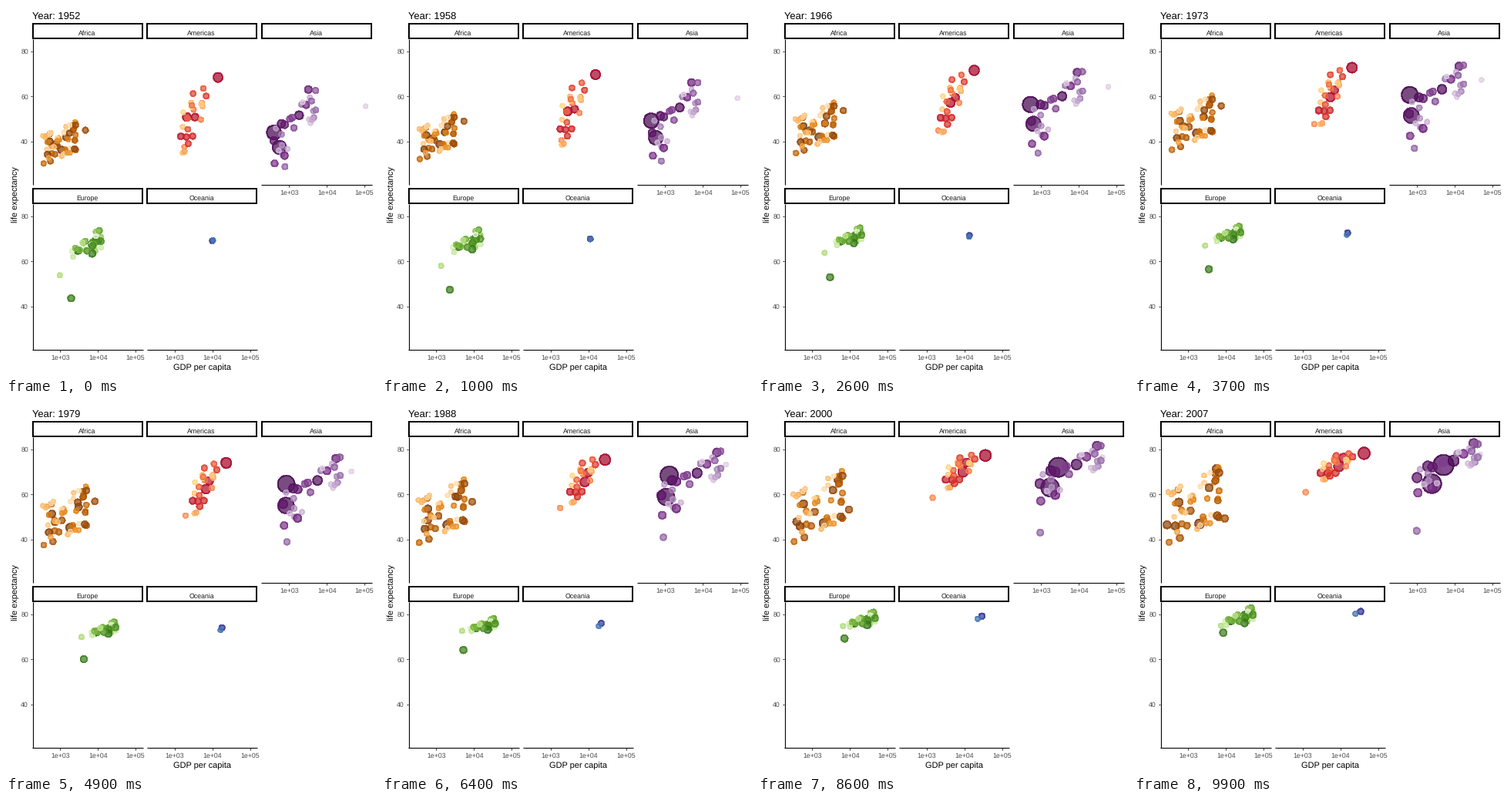
A matplotlib script for the animation above (10000 ms loop, 480x480 px).

```python
import numpy as np
import matplotlib.pyplot as plt
from matplotlib.animation import FuncAnimation
from matplotlib.colors import LinearSegmentedColormap
from matplotlib.patches import Rectangle

FRAMES, STEP = 100, 100
FIRST, LAST = 1952, 2007
plt.rcParams["font.family"] = ["Liberation Sans", "DejaVu Sans"]
plt.rcParams["text.hinting"] = "none"
rng = np.random.default_rng(12)

# leads: population in millions, then (log income, life expectancy) at the
# start, the middle and the end.
# crowd: mean and spread of both values at the same three times.
# pops: count, largest population and decay of the crowd.
CONTINENTS = {
    "Africa": dict(
        cell=(0, 0), shades="#7F3B08 #B35806 #E08214 #FDB863 #FEE0B6",
        growth=.32, tilt=.4, pops=(48, 76, .11),
        leads=[(135, (3.03, 36.3), (3.26, 45.3), (3.3, 46.9)),
               (80, (3.15, 41.9), (3.49, 54.5), (3.75, 71.3)),
               (65, (2.89, 39.1), (2.86, 47.8), (2.44, 46.5)),
               (44, (3.67, 45), (3.92, 56.9), (3.97, 49.3))],
        crowd=[(3.0, .27, 39.2, 4.6), (3.15, .36, 50.3, 6.5), (3.18, .42, 55, 8.3)]),
    "Americas": dict(
        cell=(1, 0), shades="#A50026 #D73027 #F46D43 #FDAE61 #FEE090",
        growth=.48, tilt=.65, pops=(21, 50, .16),
        leads=[(301, (4.15, 68.4), (4.37, 74), (4.63, 78.2)),
               (190, (3.32, 50.9), (3.83, 62.4), (3.96, 72.4)),
               (109, (3.54, 50.8), (3.92, 66.1), (4.08, 76.2)),
               (8.5, (3.26, 37.6), (3.29, 50.7), (3.08, 60.9))],
        crowd=[(3.5, .2, 53, 8.5), (3.8, .19, 65.5, 6.5), (3.9, .25, 73.8, 3.4)]),
    "Asia": dict(
        cell=(2, 0), shades="#40004B #762A83 #9970AB #C2A5CF #E7D4E8",
        growth=.41, tilt=.7, pops=(28, 220, .17),
        leads=[(1318, (2.6, 44), (2.93, 64.7), (3.7, 73)),
               (1110, (2.74, 37.4), (2.92, 55.2), (3.39, 64.7)),
               (127, (3.51, 63), (4.25, 76), (4.5, 82.6)),
               (32, (2.89, 28.8), (2.94, 39), (2.99, 43.8)),
               (2.5, (5.03, 55.6), (4.65, 70.3), (4.67, 77.6))],
        crowd=[(3.15, .33, 46.5, 7.5), (3.6, .45, 61.5, 7), (3.8, .48, 71.5, 5)]),
    "Europe": dict(
        cell=(0, 1), shades="#276419 #4D9221 #7FBC41 #B8E186 #E6F5D0",
        growth=.75, tilt=.75, pops=(26, 60, .15),
        leads=[(82, (3.85, 67.5), (4.32, 73), (4.51, 79.4)),
               (61, (4.0, 69.2), (4.25, 73.2), (4.52, 79.4)),
               (45, (3.29, 43.6), (3.63, 60.2), (3.93, 71.8)),
               (4.5, (2.99, 53.8), (3.57, 70), (3.87, 74.9))],
        crowd=[(3.68, .24, 65.5, 4), (4.14, .2, 72.5, 2), (4.33, .23, 77.5, 2.6)]),
    "Oceania": dict(
        cell=(1, 1), shades="#313695 #4575B4", growth=.45, tilt=0, pops=(0, 1, 1),
        leads=[(20.4, (4.0, 69.1), (4.26, 74.1), (4.54, 81.2)),
               (4.1, (4.02, 69.4), (4.22, 73), (4.4, 80.2))],
        crowd=[]),
}


def px(log_gdp, col):
    return 70.3 + 148.5 * col + 48.9 * (log_gdp - 3)


def py(life, row):
    return 58.7 + 214 * row + 2.925 * (80 - life)


def make_crowd(stats, count, tilt):
    """Key points, shaped (3, count, 2); richer places tend to live longer."""
    rich, luck = rng.uniform(-1.7, 1.7, (2, count))
    health = tilt * rich + np.sqrt(1 - tilt ** 2) * luck
    return np.array([np.column_stack([g + gs * rich, e + es * health])
                     for g, gs, e, es in stats])


fig = plt.figure(figsize=(480 / 72, 480 / 72), dpi=72, facecolor="white")
ax = fig.add_axes([0, 0, 1, 1])
ax.set(xlim=(0, 480), ylim=(480, 0))
ax.axis("off")


def line(x0, y0, x1, y1, color="black"):
    ax.plot([x0, x1], [y0, y1], color=color, lw=1.07, solid_capstyle="butt")


def label(x, y, text, size=8.8, color="#4D4D4D", ha="center", **kw):
    return ax.text(x, y, text, fontsize=size, color=color, ha=ha, va="baseline", **kw)


def y_axis(row):
    top = 43 + 214 * row
    line(34.5, top, 34.5, top + 189)
    for v in (40, 60, 80):
        y = py(v, row)
        line(31.5, y, 34, y, "#333333")
        label(29, y + 3.3, str(v), ha="right")


def x_axis(col, row):
    left, y = 34 + 148.5 * col, 231.5 + 214 * row
    line(left, y, left + 143.5, y)
    for p in (3, 4, 5):
        x = px(p, col)
        line(x, y + .5, x, y + 3, "#333333")
        label(x, y + 13.5, f"1e+0{p}")


class Group:
    """All the bubbles of one panel."""

    def __init__(self, name, spec):
        count, top, decay = spec["pops"]
        self.cell, self.growth = spec["cell"], spec["growth"]
        self.keys = np.array([lead[1:] for lead in spec["leads"]]).swapaxes(0, 1)
        if count:
            crowd = make_crowd(spec["crowd"], count, spec["tilt"])
            self.keys = np.concatenate([self.keys, crowd], axis=1)
        pops = rng.permutation(top * np.exp(-decay * np.arange(count)))
        self.pop = np.append([lead[0] for lead in spec["leads"]], pops)

        rank = np.argsort(np.argsort(-self.pop))
        cmap = LinearSegmentedColormap.from_list(name, spec["shades"].split())
        blank = np.zeros(len(rank))
        self.dots = ax.scatter(blank, blank, c=cmap(rank / rank.max()), alpha=.7,
                               lw=1, antialiased=False, zorder=3)

    def move(self, u):
        col, row = self.cell
        bend = [(2 * u - 1) * (u - 1), 4 * u * (1 - u), u * (2 * u - 1)]
        g, e = np.tensordot(bend, self.keys, 1).T
        self.dots.set_offsets(np.column_stack([px(g, col), py(e, row)]))
        pop = self.pop * self.growth ** (1 - u)
        size = 2 + 10 * np.sqrt(pop / 1318)
        self.dots.set_sizes((2.134 * size + .709) ** 2)


groups = []
for name, spec in CONTINENTS.items():
    col, row = spec["cell"]
    left, top = 34.5 + 148.5 * col, 23 + 214 * row
    ax.add_patch(Rectangle((left, top), 142, 19, fc="white", ec="black", lw=2))
    label(left + 70.5, top + 15, name, color="#1A1A1A")
    groups.append(Group(name, spec))

y_axis(0)
y_axis(1)
x_axis(2, 0)
x_axis(0, 1)
x_axis(1, 1)
label(254.5, 473, "GDP per capita", 11, "black")
label(15.5, 245, "life expectancy", 11, "black", rotation=90, rotation_mode="anchor")
title = label(34, 17, "", 13, "black", ha="left")


def update(i):
    u = i / (FRAMES - 1)
    title.set_text(f"Year: {round(FIRST + (LAST - FIRST) * u)}")
    for group in groups:
        group.move(u)
    return [title] + [group.dots for group in groups]


anim = FuncAnimation(fig, update, frames=FRAMES, interval=STEP, repeat=True,
                     repeat_delay=0, blit=False)
plt.show()
```
